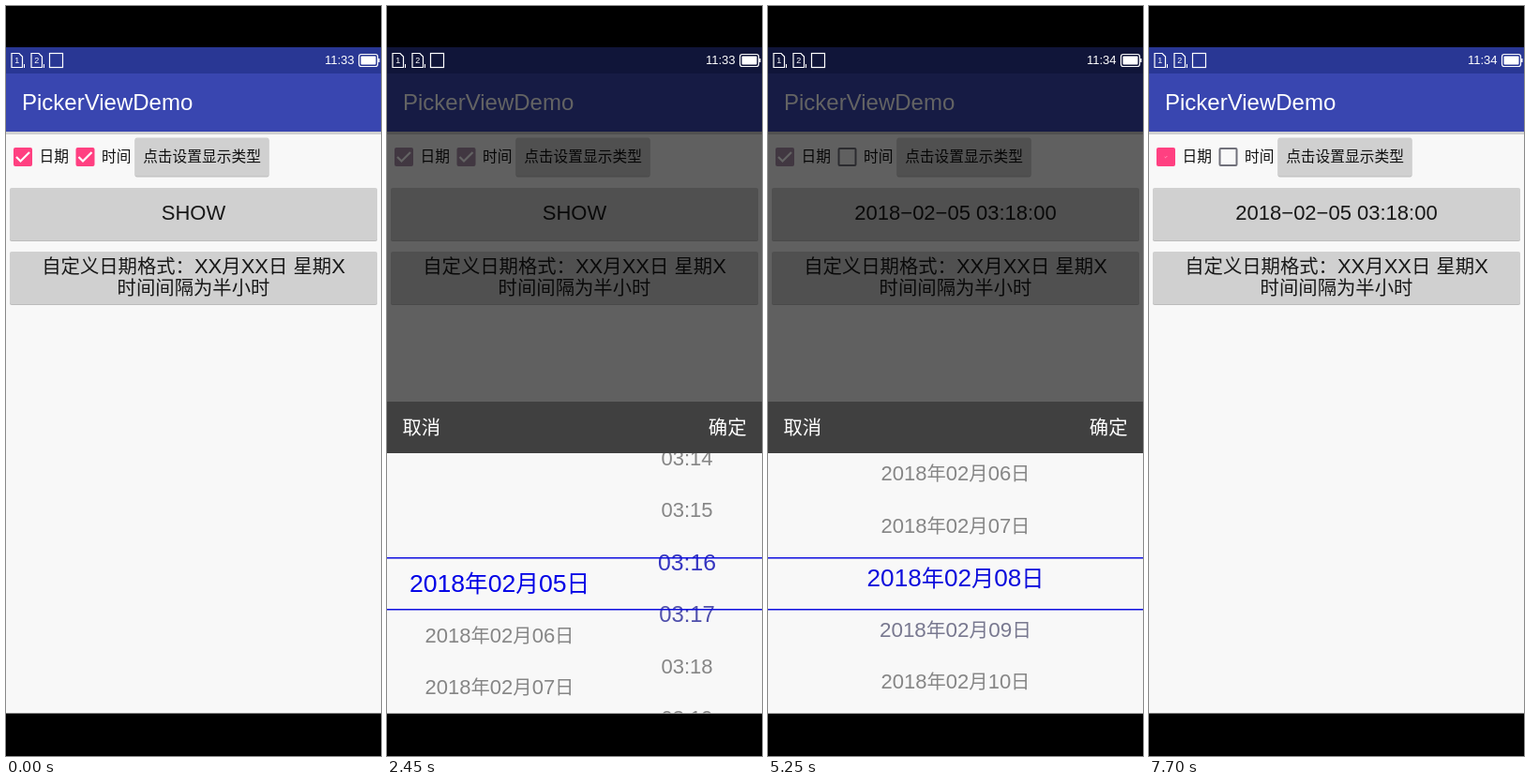
Recreate the animation shown at these times as an HTML page with a canvas. Size 400x800 px, loop 8000 ms.

```html
<!DOCTYPE html>
<html lang="zh">
<head>
<meta charset="utf-8">
<title>PickerViewDemo</title>
<style>
html, body { margin: 0; width: 100%; height: 100%; overflow: hidden; background: #000; }
canvas { display: block; }
</style>
</head>
<body>
<canvas id="stage" width="400" height="800"></canvas>
<script>
const ctx = document.getElementById('stage').getContext('2d');
const LOOP = 8000, STEP = 350;
const PANEL_TOP = 422, HEADER = 55, PANEL_H = 333, ROW = 55.5, BOTTOM = 754.5;
const CJK = /[\u3000-\u9fff\uff00-\uffef]+|[^\u3000-\u9fff\uff00-\uffef]+/g;

// Motion: [time, value] points, linear between them
const SLIDE = [[700, 333], [1050, 0], [2800, 0], [3150, 270], [3500, 333],
  [4550, 333], [4900, 0], [7000, 0], [7350, 270], [7700, 333]];
const DIM = [[700, 0], [1050, .61], [2800, .61], [3150, .29], [3500, 0],
  [4550, 0], [4900, .61], [7000, .61], [7350, .29], [7700, 0]];
const DAY = [[1050, 5], [1400, 7.75], [1750, 6], [2100, 5], [4900, 5], [5250, 8.1],
  [5600, 8], [5950, 8.9], [6300, 10.49], [6650, 11.4], [7000, 11]];
const MINUTE = [[2100, 14], [2450, 16.4], [2800, 18]];
const DATE_CHECK = [[7350, 1], [7700, .5]];
const TIME_CHECK = [[3500, 1], [4200, 0]];

function at(points, t) {
  const next = points.findIndex(p => p[0] > t);
  if (next < 0) return points[points.length - 1][1];
  if (next === 0) return points[0][1];
  const [t0, a] = points[next - 1], [t1, b] = points[next];
  return a + (b - a) * (t - t0) / (t1 - t0);
}

const pad = n => String(n).padStart(2, '0');

function rect(x, y, w, h, color, r = 0) {
  ctx.fillStyle = color;
  ctx.beginPath();
  ctx.roundRect(x, y, w, h, r);
  ctx.fill();
}

function path(points, color, width) {
  ctx.strokeStyle = color;
  ctx.lineWidth = width;
  ctx.beginPath();
  points.forEach(([x, y]) => ctx.lineTo(x, y));
  ctx.stroke();
}

// Chinese runs are set a little smaller than Latin ones; y is the middle of the line
function text(str, x, y, size, color, align = 0) {
  const runs = str.match(CJK).map(s => {
    const font = s.charCodeAt(0) >= 0x3000 && s !== '−'
      ? `${size * .925}px "Noto Sans CJK SC", "Noto Sans CJK", sans-serif`
      : `${size}px "Liberation Sans", Arial, sans-serif`;
    ctx.font = font;
    return { s, font, w: ctx.measureText(s).width };
  });
  x -= align * runs.reduce((sum, r) => sum + r.w, 0);
  ctx.fillStyle = color;
  for (const r of runs) {
    ctx.font = r.font;
    ctx.fillText(r.s, x, y + size * .33);
    x += r.w;
  }
}

function button(x, y, w, h, pressed) {
  if (pressed) rect(x - 1, y - .5, w + 2, h + 3.5, '#bcbcbc', 3);
  else rect(x, y + 1, w, h, '#bcbcbc', 2);
  rect(x - pressed, y, w + 2 * pressed, h + 2 * pressed, '#d0d0d0', 2);
}

function checkbox(x, y, state, color) {
  if (state === 0) {
    ctx.strokeStyle = '#70707a';
    ctx.lineWidth = 2;
    ctx.beginPath();
    ctx.roundRect(x + 1, y + 1, 18, 18, 1);
    ctx.stroke();
    return;
  }
  rect(x, y, 20, 20, color, 2);
  ctx.save();
  ctx.translate(x + 10, y + 10);
  const k = Math.max(.2, 2 * state - 1);
  ctx.scale(k, k);
  path([[-7, 0], [-2.5, 4.5], [7, -5]], '#fff', 2.2);
  ctx.restore();
}

function page(t, dim) {
  rect(0, 44, 400, BOTTOM - 44, '#f8f8f8');
  rect(0, 134, 400, 3, '#d0d0d0');
  rect(0, 44, 400, 28, '#293794');
  rect(0, 72, 400, 62, '#3946b0');
  text('PickerViewDemo', 17, 103, 24, '#fff');

  const accent = dim > .5 ? '#a88ea8' : '#ff4081';
  checkbox(8, 151, at(DATE_CHECK, t), accent);
  checkbox(74.5, 151, at(TIME_CHECK, t), accent);
  text('日期', 35.5, 160.5, 17, '#101010');
  text('时间', 102, 160.5, 17, '#101010');
  button(137.5, 140.5, 143, 41, 0);
  text('点击设置显示类型', 209, 160.5, 17, '#101010', .5);

  const pressed = t === 700 || t === 4550 ? 1 : 0;
  button(4, 194, 392, 56, pressed);
  text(t < 3150 ? 'SHOW' : '2018−02−05 03:18:00', 200, 221, 22, '#181818', .5);
  button(4, 262, 392, 56, 0);
  text('自定义日期格式：XX月XX日 星期X', 200, 278, 22, '#181818', .5);
  text('时间间隔为半小时', 200, 301, 22, '#181818', .5);

  rect(0, 44, 400, BOTTOM - 44, `rgba(0,0,0,${dim})`);
}

function statusBar(t) {
  ['1', '2'].forEach((label, i) => {
    const x = 6 + i * 21;
    path([[x, 50.5], [x + 8, 50.5], [x + 11.5, 54], [x + 11.5, 65.5], [x, 65.5], [x, 50]], '#fff', 1.2);
    text(label, x + 5.8, 58.5, 9, '#fff', .5);
    rect(x + 13, 62, 1, 4, '#fff');
  });
  ctx.lineWidth = 1.2;
  ctx.strokeRect(46.5, 50.5, 14, 15);
  text(t < 2800 ? '11:33' : '11:34', 371.5, 58, 13, '#fff', 1);
  ctx.beginPath();
  ctx.roundRect(376.5, 51.5, 20, 13, 2.5);
  ctx.stroke();
  rect(378.5, 53.5, 16, 9, '#fff', 1);
  rect(397, 56, 1.5, 4, '#fff');
}

// Rows near the middle grow and turn from grey to blue
function wheel(x, top, pos, first, label) {
  for (let i = Math.max(first, Math.floor(pos - 3)); i <= pos + 3; i++) {
    const near = Math.max(0, 1 - Math.abs(i - pos));
    const grey = 134 * (1 - near);
    const color = `rgb(${grey},${grey},${134 + 96 * near})`;
    text(label(i), x, top + HEADER + ROW * (2.5 + i - pos), 22 * (1 + .21 * near), color, .5);
  }
}

function panel(t) {
  const top = PANEL_TOP + at(SLIDE, t);
  if (top >= BOTTOM) return;
  ctx.save();
  ctx.beginPath();
  ctx.rect(0, top, 400, BOTTOM - top);
  ctx.clip();
  rect(0, top, 400, PANEL_H, '#f8f8f8');
  const withTime = t < 4000;
  wheel(withTime ? 120 : 200, top, at(DAY, t), 5, i => `2018年02月${pad(i)}日`);
  if (withTime) wheel(320, top, at(MINUTE, t), 14, i => `03:${pad(i)}`);
  for (const row of [2, 3]) rect(0, Math.floor(top + HEADER + ROW * row), 400, 1.5, '#1010e0');
  rect(0, top, 400, HEADER, '#404040');
  text('取消', 16.5, top + 27.5, 22, '#fff');
  text('确定', 383.5, top + 27.5, 22, '#fff', 1);
  ctx.restore();
}

function draw(now) {
  // The screen refreshes once per STEP
  const t = Math.floor(now % LOOP / STEP) * STEP;
  rect(0, 0, 400, 800, '#000');
  page(t, at(DIM, t));
  statusBar(t);
  panel(t);
  requestAnimationFrame(draw);
}
requestAnimationFrame(draw);
</script>
</body>
</html>
```
